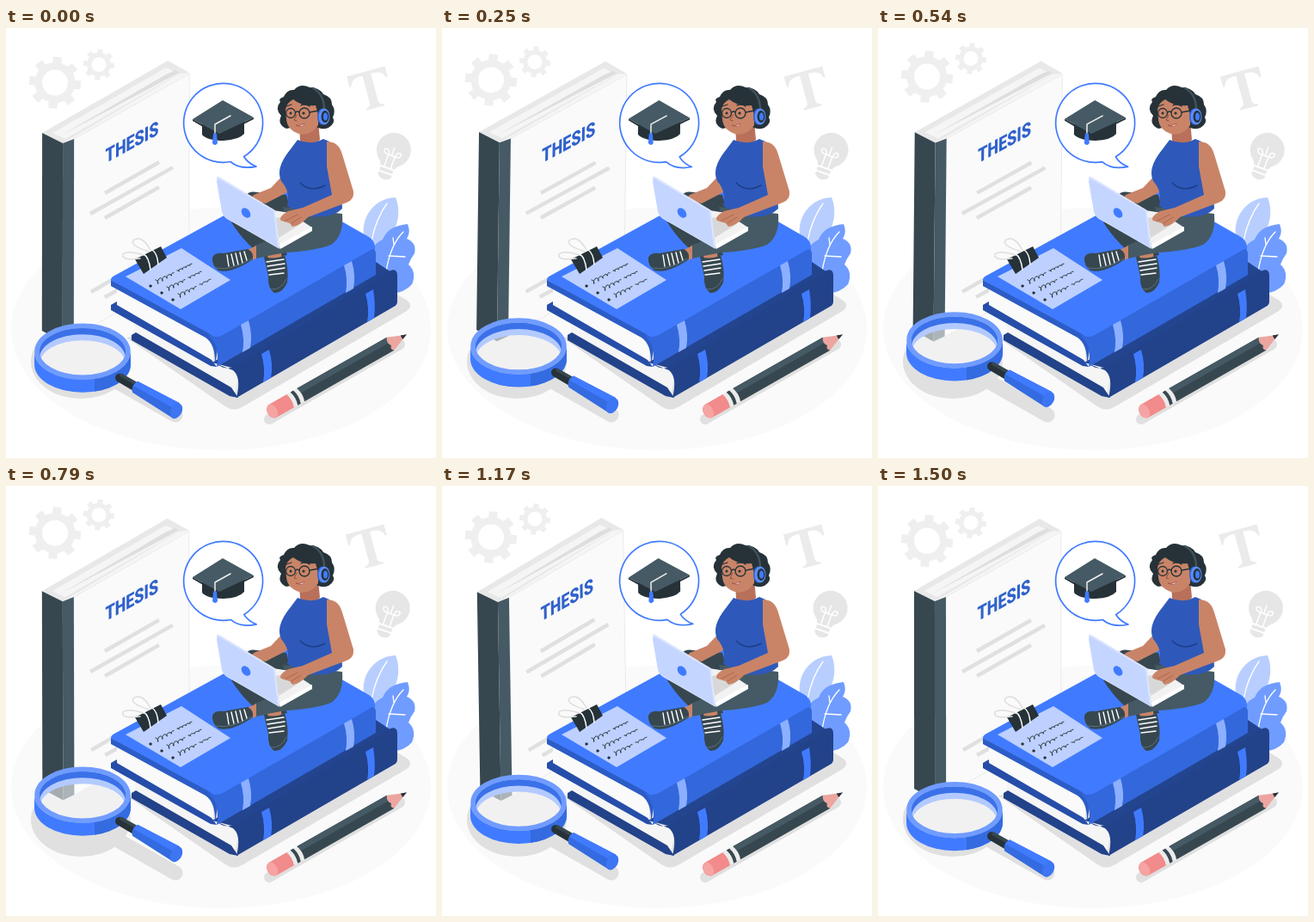
Write an HTML page that moves like this. It is 500 px wide and 500 px high and loops after 1540 ms.

```html
<!DOCTYPE html>
<html lang="en">
<head>
<meta charset="utf-8">
<title>Thesis</title>
<style>
  html, body { margin: 0; width: 100%; height: 100%; overflow: hidden; background: #fff; }
  svg { display: block; width: 100vw; height: 100vh; }
  .line { fill: none; stroke-linecap: round; stroke-linejoin: round; }
</style>
</head>
<body>
<svg viewBox="0 0 500 500">
  <defs>
    <clipPath id="opening"><ellipse cx="89" cy="376.500" rx="50.500" ry="27.500"/></clipPath>
  </defs>
  <ellipse cx="250" cy="350" rx="244" ry="141" fill="#fafafa"/>

  <g id="gears" fill="none" stroke="#efefef"></g>
  <g id="icons" fill="#e6e6e6">
    <path fill="#ebebeb" transform="translate(418.500 50.500) rotate(-15)" d="M-23 0H23V13H21Q19 4 9 4H5V38Q6 41 11 42V44H-11V42Q-6 41-5 38V4H-9Q-19 4-21 13H-23Z"/>
    <g transform="rotate(20 451 142)">
      <path d="M442 163Q442 160 438 157A20 20 0 1 1 464 157Q460 160 460 163Z"/>
      <path d="M443 165H459V169H443ZM443 171H459V174Q455 178 451 178Q447 178 443 174Z"/>
      <path class="line" stroke="#fff" stroke-width="1.500" d="M447 163V149Q440 149 441 144Q446 141 448 149H455Q456 141 461 144Q462 149 455 149V163M451 149V139"/>
    </g>
  </g>

  <!-- floor shadows -->
  <g fill="#e0e0e0">
    <path d="M140 360L255 440Q265 447 276 440L466 329Q473 324 468 318L440 300Z"/>
    <ellipse cx="87" cy="388" rx="58" ry="43"/>
    <path class="line" stroke="#e0e0e0" stroke-width="17" d="M125 409L197 450"/>
    <path class="line" stroke="#e0e0e0" stroke-width="12" d="M306 455L458 368"/>
  </g>

  <g id="thesis">
    <path fill="#e8e8e8" d="M42 122L188 38L213 52L66 134Z"/>
    <path fill="#f5f5f5" d="M54 122L186 46L201 53L69 129Z"/>
    <path fill="#dedede" d="M62 126L186 54L197 49L201 52L154 77Z"/>
    <path fill="#f5f5f5" d="M66 134L202 53L213 52L79 130Z"/>
    <path fill="#fafafa" stroke="#e6e6e6" stroke-width=".8" d="M79 129L213 53V283L79 359Z"/>
    <path fill="#37474f" d="M42 122L66 134V365L42 352Z"/>
    <path fill="#455a64" d="M66 134L79 129V359L66 365Z"/>
    <path fill="none" stroke="#e0e0e0" stroke-width="4.500" d="M115 192L178 156M98 216L194 162M115 221L178 185M99 307L130 289M115 313L135 302"/>
    <text transform="matrix(.78 -.43 0 1 115.500 157.500)" font-family="Roboto, sans-serif" font-weight="900" font-size="23" fill="#3062cc">THESIS</text>
  </g>

  <g id="leaves">
    <path fill="#b8ceff" d="M419 252C408 226 425 198 453 197C460 214 457 240 432 254Z"/>
    <path fill="#709cff" d="M424 270Q424 252 438 246Q444 230 467 228Q471 238 466 245Q478 250 475 262Q470 269 468 275Q478 284 472 298Q464 308 446 309Z"/>
    <path class="line" stroke="#fff" stroke-width="1.300" d="M443 204Q430 222 425 248M462 237Q447 252 442 283M445 265L464 266M451 252L450 244"/>
  </g>

  <g id="lower-book">
    <path fill="#f5f5f5" d="M150 345L244 390L272 396L267 424L150 358Z"/>
    <path fill="#22428a" d="M146 357L151 354L262 418L270 430L260 428L146 363Z"/>
    <path fill="#23458f" d="M240 389L266 396L454 288L430 272Z"/>
    <path fill="#22428a" d="M246 391Q256 399 268 393L447 282Q455 279 455 288V318Q455 322 451 324L268 430Q274 406 264 398Z"/>
    <path fill="#407bff" d="M297 379L306 374Q311 392 308 407L299 412Q302 396 297 379ZM418 309L427 304Q430 322 428 337L420 342Q423 326 418 309Z"/>
  </g>

  <g id="upper-book">
    <path fill="#264ea9" d="M122 322L129 318L236 382L245 394L238 393L122 328Z"/>
    <path fill="#fafafa" d="M129 300L230 355Q243 360 241 387L129 322Z"/>
    <path fill="#407bff" d="M122 293Q122 290 126 288L310 187Q318 183 326 188L422 243Q432 250 428 262L250 363Q243 365 234 358Z"/>
    <path fill="#2c5cc6" d="M122 293L234 354Q246 360 246 374L243 392Q244 368 232 360L122 300Z"/>
    <path fill="#3367dc" d="M232 354Q242 362 252 357L426 257Q431 257 430 268V287L245 394Q250 367 232 354Z"/>
    <path fill="#8cb0ff" d="M273 345L282 340Q287 357 284 372L275 377Q278 362 273 345ZM393 276L402 271Q407 287 404 303L395 308Q398 292 393 276Z"/>
  </g>

  <g id="note">
    <path fill="#bdd0ff" d="M139 289L204 256L261 293L203 327Z"/>
    <g id="writing" class="line" stroke="#263238"></g>
    <path fill="#263238" d="M150 269L180 254L187 267L160 286Z"/>
    <g class="line" stroke-width="1.500">
      <path stroke="#dedede" d="M156 268Q134 271 136 263Q140 258 160 264M166 260Q144 253 148 247Q158 240 168 258"/>
      <path stroke="#fff" d="M160 263Q166 266 168 281M170 258Q176 262 177 275"/>
    </g>
  </g>

  <g id="student">
    <path fill="#37474f" d="M278 196Q282 189 292 191L326 194L334 222L290 214Z"/>
    <path fill="#c98468" d="M325 168L329 190L302 204L283 200L288 194L308 186Z"/>
    <path fill="#37474f" d="M262 226L282 224L320 247L327 264L303 268Q280 254 262 226Z"/>
    <path fill="#455a64" d="M322 208L391 216Q393 242 378 252Q360 259 326 261L291 268L289 253Q310 246 330 236Z"/>
    <path fill="#c98468" d="M281 258L291 253L291 268L283 271ZM304 265L320 262L321 270L306 272Z"/>
    <path fill="#37474f" d="M240 267Q242 261 253 262L281 257Q288 260 287 269Q262 286 247 282Q239 276 240 267Z"/>
    <path fill="#37474f" d="M300 266Q313 270 324 264Q329 281 327 296Q321 309 312 308Q304 303 305 289Z"/>
    <path class="line" stroke="#fff" stroke-width="1.400" d="M257 264L259 277M262 263L265 276M267 262L270 275M272 261L275 273M277 260L280 270M303 272L323 269M304 277L324 274M305 282L324 279M306 287L323 285"/>
    <path class="line" stroke="#607d8b" stroke-width=".8" d="M244 279Q262 283 286 268M308 304Q320 305 326 292"/>
    <path fill="#b9705a" d="M341 112L363 108L365 130Q355 141 342 131Z"/>
    <path fill="#2e59ba" d="M339 130Q355 137 369 129L376 132L378 162Q391 186 391 210Q380 222 352 219L327 207Q331 190 320 178Q313 163 330 142Z"/>
    <path class="line" stroke="#1d3d87" stroke-width="1.500" d="M342 180Q354 192 371 183"/>

    <path fill="#f2f2f2" d="M311 212L330 215L356 232L318 256Z"/>
    <path fill="#d8d8d8" d="M313 221L326 219L341 229L317 244Z"/>
    <path fill="#fff" d="M317 252L356 231V236L319 257Z"/>
    <path fill="#dbe5ff" d="M248 173L313 212L318 257L257 222Q252 219 251 213L245 177Q244 171 248 173Z"/>
    <path fill="#c4d5ff" d="M247 175L311 213L316 255L257 221Q252 218 251 213L245 178Z"/>
    <ellipse cx="279" cy="215" rx="4.500" ry="6.500" transform="rotate(-38 279 215)" fill="#407bff"/>

    <path fill="#c98468" d="M373 132Q387 132 391 147L404 190Q405 200 396 203L351 220Q342 230 333 231L330 227L320 224Q316 220 328 213L345 209L379 194L373 161Z"/>
    <path class="line" stroke="#a45f47" stroke-width=".8" d="M325 224L339 217M332 227L343 220"/>

    <path fill="#263238" d="M326 117Q315 112 320 102Q312 94 319 86Q316 82 323 80Q327 71 335 72Q342 64 353 69Q364 69 369 77Q379 80 379 89Q384 96 380 104Q384 110 375 116Q364 120 357 111Z"/>
    <path fill="#c98468" d="M325 95Q326 87 334 83Q345 92 360 90L363 101V113Q355 125 342 123.500Q327 119 326 106Z"/>
    <g class="line" stroke="#263238" stroke-width="1.300">
      <circle cx="331" cy="99" r="5.500"/>
      <circle cx="347" cy="99" r="6"/>
      <path d="M337 98Q339 96 341 98M353 98L364 96M326 91L332 89M343 90Q348 87 353 91"/>
    </g>
    <circle cx="331" cy="99" r="1.500" fill="#263238"/>
    <circle cx="346" cy="99" r="1.600" fill="#263238"/>
    <path class="line" stroke="#8d4f38" d="M338 101L335 107L338 108"/>
    <path fill="#fff" stroke="#a0443c" stroke-width=".7" d="M337 113Q342 115 347 111Q345 117 337 113Z"/>
    <path class="line" stroke="#41525b" stroke-width="2.500" d="M357 70Q370 77 370 95"/>
    <ellipse cx="367.500" cy="103" rx="5.500" ry="9.500" fill="#2f60cc"/>
    <ellipse cx="370" cy="103" rx="6.500" ry="9.500" fill="#5b8eff"/>
    <ellipse cx="371" cy="103" rx="4.500" ry="7" fill="#263238"/>
    <ellipse cx="371.500" cy="103" rx="2.500" ry="4.500" fill="#407bff"/>
  </g>

  <g id="bubble">
    <path fill="#fff" stroke="#407bff" stroke-width="1.700" stroke-linejoin="round" d="M276.700 149.500A46 46 0 1 0 261.200 155.500Q272 165 291 161Q281 157 276.700 149.500Z"/>
    <path fill="#263238" d="M228 109V124Q234 131 253 131Q271 130 277 123V107Z"/>
    <path fill="#263238" d="M217 106L248 123L288 104V106L248 126L217 108Z"/>
    <path fill="#455a64" d="M217 106L252 84L288 104L248 123Z"/>
    <path class="line" stroke="#f0f0f0" stroke-width="1.500" d="M261 102L243 112V123"/>
    <path fill="#407bff" d="M241 123Q243 121 245 123L246 134Q243 138 240 134Z"/>
  </g>

  <g id="pencil" transform="translate(311.500 444.500) rotate(-29.700)">
    <path fill="#f28b8b" d="M-2-8.700H24V8.700H-2Q-8 7-8 0Q-8-7-2-8.700Z"/>
    <ellipse cx="-2" cy="0" rx="5.500" ry="8.700" fill="#f6a3a3"/>
    <path fill="#ebebeb" d="M22-8.700H38V8.700H22Q25 0 22-8.700Z"/>
    <path fill="#37474f" d="M27-8.700H31Q34 0 31 8.700H27Q30 0 27-8.700ZM36-8.700H156V8.700H36Q39 0 36-8.700Z"/>
    <path fill="#455a64" d="M36-8.700H156V-2H38Z"/>
    <path fill="#eda5a0" d="M156-8.700L177 0L156 8.700Q152 5 156 2Q152-3 156-8.700Z"/>
    <path fill="#263238" d="M171-2.500L178 0L171 2.500Z"/>
  </g>

  <g id="magnifier">
    <ellipse cx="89" cy="376.500" rx="50" ry="27.500" fill="#fff" opacity=".55"/>
    <g clip-path="url(#opening)" fill-rule="evenodd">
      <path fill="#b3caff" d="M30 340H150V430H30ZM39 391A50 27.500 0 0 0 139 391A50 27.500 0 0 0 39 391Z"/>
      <path fill="#3b71e8" d="M30 340H150V430H30ZM39 384A50 27.500 0 0 0 139 384A50 27.500 0 0 0 39 384Z"/>
    </g>
    <path fill="#407bff" d="M33 376.500V391.500A56 32.500 0 0 0 145 391.500V376.500A56 32.500 0 0 1 33 376.500Z"/>
    <path fill="#346be0" d="M103 408V423A56 32.500 0 0 0 145 391.500V376.500A56 32.500 0 0 1 103 408Z"/>
    <ellipse cx="89" cy="376.500" rx="53" ry="30" fill="none" stroke="#709cff" stroke-width="5.500"/>
    <path class="line" stroke="#263238" stroke-width="10" d="M132 407L149 417"/>
    <path class="line" stroke="#37474f" stroke-width="4" d="M134 404L150 413"/>
    <path fill="#346be0" d="M153 411L202 436.500L194 454L147 424Q145 415 153 411Z"/>
    <path fill="#407bff" d="M153 411L202 436.500L198 444L148 416Z"/>
    <ellipse cx="198" cy="445.500" rx="6.500" ry="9.500" transform="rotate(28 198 445.500)" fill="#3d75f2"/>
  </g>
</svg>

<script>
const LOOP = 1540, STEPS = 37;
const byId = id => document.getElementById(id);

function gear(cx, cy, outer, body, hole) {
  const tooth = outer * 0.34;
  let d = "";
  for (let i = 0; i < 8; i++) {
    const a = (i + 0.12) * Math.PI / 4, c = Math.cos(a), s = Math.sin(a);
    d += `M${cx + body * 0.9 * c} ${cy + body * 0.9 * s}L${cx + outer * c} ${cy + outer * s}`;
  }
  return `<circle cx="${cx}" cy="${cy}" r="${(body + hole) / 2}" stroke-width="${body - hole}"/>
    <path d="${d}" stroke-width="${tooth}"/>`;
}
byId("gears").innerHTML = gear(57, 64, 30, 23.5, 15) + gear(108, 43, 18, 14, 8.5);

// Cursive scribble climbing to the right.
function scribble(x, y, length, height, loops) {
  let d = "";
  for (let i = 0; i <= 40; i++) {
    const u = i / 40, a = u * loops * 2 * Math.PI;
    const px = x + u * length + 1.3 * Math.sin(a);
    const py = y - u * length * 0.5 - height * Math.cos(a) * (1 - 0.7 * u);
    d += `${i ? "L" : "M"}${px.toFixed(1)} ${py.toFixed(1)}`;
  }
  return `<path d="${d}"/>`;
}
byId("writing").innerHTML = [[168, 300], [181, 308], [194, 316]].map(([x, y], row) =>
  `<circle cx="${x}" cy="${y}" r="1.2" fill="#263238"/>` +
  scribble(x + 6, y - 4, 21, 3, 4) +
  scribble(x + 31, y - 17, 17 - row * 2, 1, 4 - row)).join("");

// Linear interpolation through [position, value] stops.
function track(p, stops) {
  const i = stops.findIndex(([at]) => at >= p);
  if (i <= 0) return stops[0][1];
  const [a, from] = stops[i - 1], [b, to] = stops[i];
  return from + (to - from) * (p - a) / (b - a);
}
const SWAY = [[0, 0], [.25, 1], [.75, -1], [1, 0]];
const FLOAT = [[0, 0], [.5, -1], [1, 0]];
const SHAKE = [[0, 0], [.1, -1], [.2, 2], [.3, -4], [.4, 4], [.5, -4],
  [.6, 4], [.7, -4], [.8, 2], [.9, -1], [1, 0]];

const start = performance.now();
function draw() {
  const t = (performance.now() - start) % LOOP;
  const step = Math.floor((t + 4) * STEPS / LOOP) % STEPS;
  const p = (step + 0.7) / STEPS;
  const move = (id, transform) => byId(id).setAttribute("transform", transform);
  const angle = track(p, SWAY), lift = track(p, FLOAT);
  move("thesis", `rotate(${angle} 127.5 201)`);
  move("bubble", `rotate(${angle} 252 113)`);
  move("icons", `translate(${track(p, SHAKE)} 0)`);
  move("gears", `translate(0 ${lift * 10})`);
  move("magnifier", `translate(0 ${lift * 19 + 0.5})`);
  requestAnimationFrame(draw);
}
draw();
</script>
</body>
</html>
```
